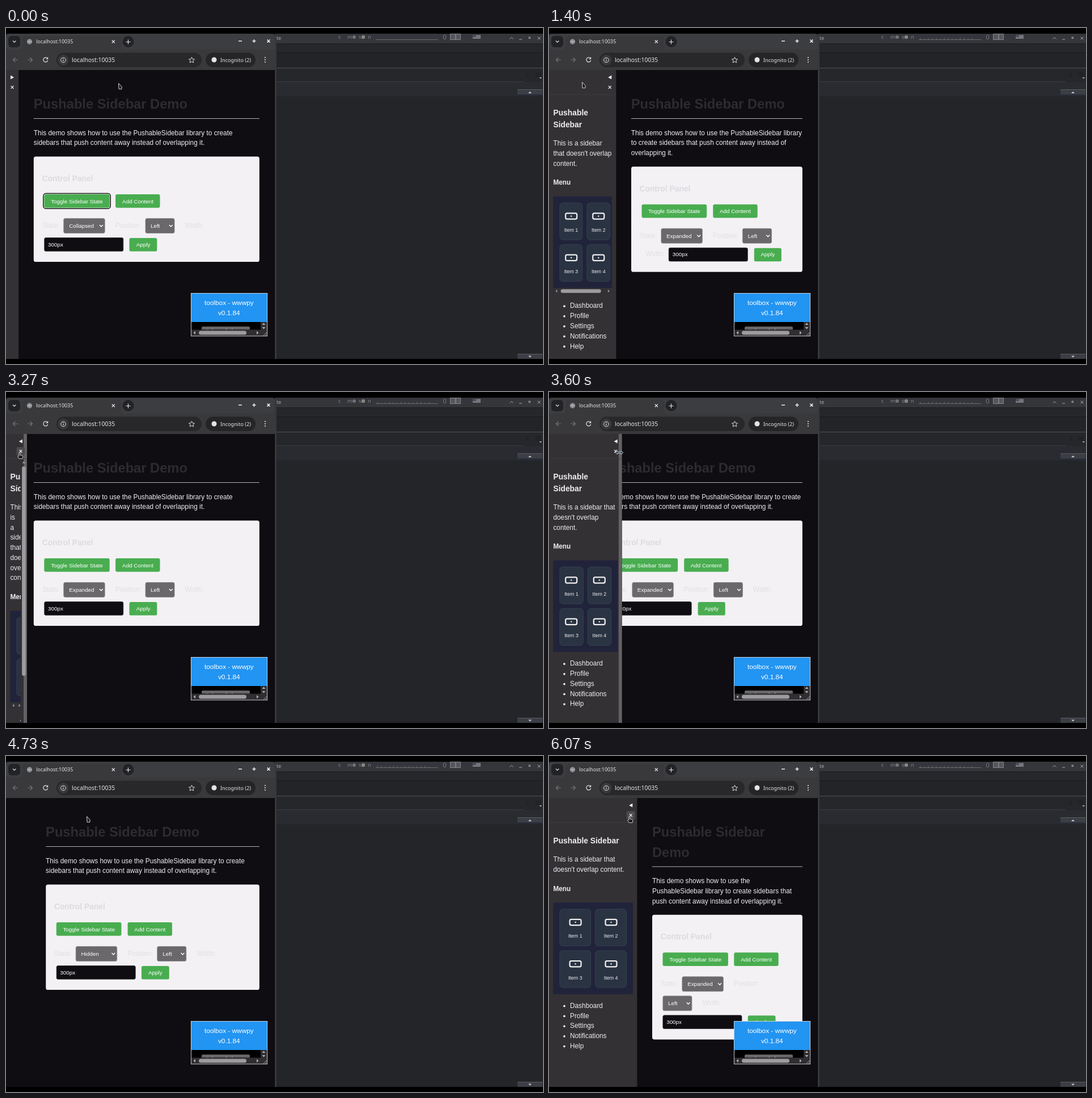
Recreate the animation shown at these times as an HTML page. Size 947x592 px, loop 6.2 s.

```html
<!DOCTYPE html>
<html lang="en">
<head>
<meta charset="utf-8">
<title>Pushable Sidebar Demo</title>
<style>
html, body { margin: 0; width: 100%; height: 100%; overflow: hidden; background: #000; }
#stage { position: absolute; left: 0; top: 0; width: 947px; height: 592px; overflow: hidden; }
#stage > svg { position: absolute; left: 0; top: 0; }
svg text { font-family: "Noto Sans", sans-serif; }
.sans { font-family: "Liberation Sans", Arial, sans-serif; }
/* the page is laid out on a 1280 x 800 screen */
#page {
  position: absolute; left: 0; top: 74px; width: 640px; height: 688px; overflow: hidden;
  transform: scale(.73984); transform-origin: 0 0; background: #0f0d11; color: #eeecef;
  font: 16px/1.5 "Liberation Sans", Arial, sans-serif; pointer-events: none;
}
#main { position: absolute; top: 36px; right: 36px; }
h1 { font-size: 32px; margin: 21.44px 0; padding-bottom: 10px; border-bottom: 1px solid #eeecef; color: #2d2b2f; }
#main p { margin: 0 0 20px; }
#panel { background: #f3f1f4; border-radius: 5px; padding: 20px; color: #e1dfe3; overflow: hidden; }
h3 { font-size: 18.72px; margin: 18.72px 0; }
#panel h3 { color: #dddbdf; }
#panel h3, #side h3 { line-height: 28.08px; }
button, select, input { font: 13.333px "Liberation Sans", Arial, sans-serif; margin: 5px; color: #fff; border-radius: 4px; }
button { padding: 8.5px 16px; border: 0; background: #49ad50; }
button.focus { box-shadow: 0 0 0 1px #fff, 0 0 0 3px #111; }
select { padding: 8.5px 8px; border: 1px solid #858385; background: #6a686a; }
input { padding: 8px; border: 1px solid #29272b; background: #0f0d11; width: 189px; box-sizing: border-box; }
label + select + label { margin-left: 15px; }
#rows { margin-top: 15px; }
#side { position: absolute; left: 0; top: 0; height: 688px; background: #333134; overflow: hidden; }
#head { position: absolute; left: 0; right: 0; top: 0; height: 58px; }
#side.open #head { border-bottom: 1px solid #3f3d40; }
#head svg { position: absolute; right: 0; top: 0; }
#body { position: absolute; left: 0; right: 0; top: 59px; height: 629px; overflow: hidden; display: none; box-sizing: border-box; padding: 0 10px; }
.open #body { display: block; }
#body.scroll { right: 15px; }
#side h3 { margin-top: 28.72px; }
#side p { margin: 0; }
h4 { font-size: 16px; margin: 21.28px 0; }
#grid { position: relative; background: #20233a; padding: 15px; overflow: hidden; display: grid; grid-template-columns: 1fr 1fr; gap: 10px; }
#grid.scroll { padding-bottom: 30px; }
.card { height: 89px; box-sizing: border-box; padding: 15px 10px; border: 1px solid #3c4759; border-radius: 8px; background: #2a3342; text-align: center; font-size: 12px; line-height: 18px; white-space: nowrap; }
.card svg { display: block; margin: 0 auto 8px; }
#hbar { position: absolute; left: 0; bottom: 0; width: 100%; height: 15px; background: #333134; overflow: hidden; }
#hbar i, #vbar i { position: absolute; background: #9d9b9e; border-radius: 5px; }
#hbar i { left: 18px; right: 26px; top: 3px; height: 9px; }
#hbar svg { position: absolute; top: 0; }
ul { margin: 16px 0; padding-left: 40px; }
#vbar { position: absolute; right: 0; top: 59px; width: 15px; height: 629px; }
#vbar i { left: 3px; width: 9px; top: 18px; }
#vbar svg { position: absolute; left: 0; top: 0; }
#grip { position: absolute; right: 0; top: 0; width: 8px; height: 688px; background: #636164; }
</style>
</head>
<body>
<div id="stage">
<svg id="chrome" width="947" height="592"></svg>
<div id="page">
  <div id="main">
    <h1>Pushable Sidebar Demo</h1>
    <p>This demo shows how to use the PushableSidebar library to create sidebars that push content away instead of overlapping it.</p>
    <div id="panel">
      <h3>Control Panel</h3>
      <div><button id="toggle" tabindex="-1">Toggle Sidebar State</button> <button tabindex="-1">Add Content</button></div>
      <div id="rows">
        <label>State:</label>
        <select id="state" tabindex="-1"><option>Expanded</option><option>Collapsed</option><option>Hidden</option></select>
        <label>Position:</label>
        <select tabindex="-1"><option>Left</option><option>Right</option></select>
        <label>Width:</label>
        <input value="300px" tabindex="-1">
        <button tabindex="-1">Apply</button>
      </div>
    </div>
  </div>
  <div id="side">
    <div id="grip"></div>
    <div id="body">
      <h3>Pushable Sidebar</h3>
      <p>This is a sidebar that doesn't overlap content.</p>
      <h4>Menu</h4>
      <div id="grid"></div>
      <ul><li>Dashboard</li><li>Profile</li><li>Settings</li><li>Notifications</li><li>Help</li></ul>
    </div>
    <div id="vbar"><svg width="15" height="15"><path d="M3.5 10.500L7.500 6L11.500 10.500Z" fill="#9d9b9e"/></svg><i id="vthumb"></i></div>
    <div id="head"><svg width="30" height="58">
      <rect id="hot" x="5" width="20" height="20" rx="3" fill="#4c4a4d"/>
      <path id="arrow" fill="#fff"/>
      <path d="M11.700 37.700l6.600 6.600m0-6.600l-6.600 6.600" stroke="#fff" stroke-width="1.500"/>
    </svg></div>
  </div>
</div>
<svg id="over" width="947" height="592"></svg>
</div>
<script>
const $ = id => document.getElementById(id);
const rect = (x, y, w, h, fill, rx = 0, more = "") =>
  `<rect x="${x}" y="${y}" width="${w}" height="${h}" rx="${rx}" fill="${fill}" ${more}/>`;
const line = (d, stroke = "#e3e2e4", w = 1.2) =>
  `<path d="${d}" fill="none" stroke="${stroke}" stroke-width="${w}"/>`;
const shape = (d, fill) => `<path d="${d}" fill="${fill}"/>`;
const disc = (x, y, r, fill, more = "") => `<circle cx="${x}" cy="${y}" r="${r}" fill="${fill}" ${more}/>`;
const text = (x, y, size, fill, s, more = "") =>
  `<text x="${x}" y="${y}" font-size="${size}" fill="${fill}" ${more}>${s}</text>`;

function browser() {
  return rect(0, 10, 474, 30, "#3c3d40", 4) + rect(0, 38, 474, 36, "#39393b")
    + shape("M24 38Q29 38 29 33V19Q29 14 34 14H198Q203 14 203 19V33Q203 38 208 38Z", "#39393b")
    + rect(4, 14, 21, 20, "#222326", 6) + line("M12 22.500l2.700 2.700l2.700-2.700")
    + disc(41.500, 24, 4.800, "#77777a") + line("M37 24H46M41.500 19.500V28.500M38.500 21Q41.500 24 38.500 27M44.500 21Q41.500 24 44.500 27", "#c9c8ca", .8)
    + text(53, 27.200, 8.880, "#e6e5e7", "localhost:10035")
    + line("M186.800 21.500l5 5m0-5l-5 5")
    + disc(215.500, 24, 10, "#222326") + line("M211.500 24.500h8m-4-4v8")
    + line("M410 23h6M434.500 23h6m-3-3v6M460.500 20.500l5 5m0-5l-5 5", "#eeeeef", 1.6)
    + line("M21 56H12.500m4-4l-4 4l4 4M38 56h8.500m-4-4l4 4l-4 4", "#77767a", 1.1)
    + line("M73 53.500A4 4 0 1 0 73.700 57M73.600 51.500V54.500H70.600", "#e3e2e4", 1.2)
    + rect(89, 43.500, 256, 25.500, "#28282b", 12.7) + disc(101, 56.500, 9.500, "#39393b")
    + disc(101, 56.500, 4.300, "none", 'stroke="#e3e2e4"') + line("M101 56v2.800M101 53.800v1.100")
    + text(116, 59.800, 10.360, "#e6e5e7", "localhost:10035")
    + line("M327.500 51.500l1.500 3.200l3.500 .4l-2.600 2.400l.8 3.500l-3.200-1.800l-3.200 1.800l.8-3.500l-2.600-2.400l3.500-.4Z", "#e3e2e4", 1)
    + rect(352, 43.500, 88, 25.500, "#252528", 12.7) + disc(367, 56, 4.500, "#e3e2e4")
    + text(378, 59.500, 9.100, "#e6e5e7", "Incognito (2)")
    + [52, 56, 60].map(y => disc(457, y, 1.1, "#e3e2e4")).join("");
}

function editor() {
  const h = (y, c) => rect(477, y, 470, 1, c);
  return rect(474, 10, 3, 573, "#37383b") + rect(477, 10, 470, 573, "#232529")
    + rect(477, 10, 470, 17, "#34363a") + rect(477, 27, 470, 16, "#25272b")
    + rect(477, 44, 470, 26, "#222428") + rect(477, 71, 470, 23, "#25272b") + rect(477, 95, 470, 25, "#292b30")
    + h(27, "#1c1d20") + h(43, "#191a1d") + h(70, "#505258") + rect(477, 94, 435, 1, "#3a3c41") + h(120, "#25272b")
    + text(477, 21, 9, "#a9aaae", "te")
    + rect(583, 10, 257, 14.500, "#34363b", 3)
    + text(586, 19, 9, "#85868a", "c") + text(602, 19, 9, "#85868a", "m")
    + disc(614, 16, 3, "#707276") + text(622, 19, 9, "#85868a", "s") + disc(630, 16, 3.200, "#84877f")
    + text(638, 19, 9, "#85868a", "n")
    + rect(771.500, 12.500, 4, 7, "none", 1, 'stroke="#77787c"')
    + rect(783.500, 10.500, 18, 10, "#55575d", 0, 'stroke="#85868b"') + line("M793 11V20", "#a0a1a5", 1)
    + rect(823, 12, 14, 7, "#6b6770") + line("M823 14.500h14M823 17.500h14", "#98949a", .8) + rect(823, 12, 6, 4, "#4b4e5e")
    + line("M888.500 19.500l3-3l3 3M905 20h5M922 16h2.500v2.500H922ZM937.500 15.500l5 5m0-5l-5 5", "#a5a6aa", 1)
    + rect(918, 79, 4, 7, "#202226") + rect(934, 78, 9, 8, "#202226")
    + shape("M940.500 87h4.500l-2.250 2.500Z", "#b5b6ba")
    + rect(902, 108, 44, 10, "#3c3e45") + rect(902, 108, 44, 1, "#595b62") + rect(902, 117, 44, 3, "#282c39")
    + shape("M921 115h6l-3-3Z", "#c8c9cd")
    + rect(902, 574, 44, 9, "#3c3e45") + rect(902, 574, 44, 1, "#595b62") + shape("M921 577.500h6l-3 3Z", "#c8c9cd");
}

function toolbox() {
  return rect(326, 467, 135, 76, "#000") + rect(326, 467, 135, 51, "#2294f2")
    + text(393.300, 488, 11.840, "#fff", "toolbox - wwwpy", 'class="sans" text-anchor="middle"')
    + text(393.300, 506, 11.840, "#fff", "v0.1.84", 'class="sans" text-anchor="middle"')
    + `<svg x="327" y="518" width="122" height="13.500">` + rect(18, 8, 85, 20, "#68666a", 2)
    + text(24, 18.500, 9.900, "#fff", "Selected element", 'class="sans"') + `</svg>`
    + rect(449, 518, 11.500, 14, "#302e31") + rect(327, 531.500, 133, 11, "#302e31")
    + rect(340, 533.500, 84, 7, "#9d9b9e", 3.5)
    + shape("M451.500 523h6l-3-3.500ZM451.500 527h6l-3 3.500ZM334 534v6l-3.500-3ZM442 534v6l3.500-3Z", "#b0aeb1")
    + line("M454 542l6-6M457.500 542l2.500-2.500", "#b0aeb1", .9)
    + rect(326.400, 467.400, 134.300, 75.400, "none", 0, 'stroke="#d9dde2" stroke-width=".9"');
}

$("chrome").innerHTML = browser() + editor() + `<path id="graph" fill="none" stroke="#686a6e" stroke-width="1.200"/>`;
$("over").innerHTML = toolbox() + `<g id="cursor">
  <path id="point" d="M.5 .5L1 10.500L5.600 10.800L6.300 6.600Z" fill="#1b1a1c" stroke="#d8d7d9" stroke-width="1"/>
  <path id="hand" d="M-1 .5Q0-.8 1 .5V5L5 6Q6 6.500 5.800 8L5 11.500H-1L-3.500 7.500Q-3.200 6-1 7Z" fill="#1b1a1c" stroke="#d8d7d9" stroke-width=".9"/>
  <path id="resize" d="M-7 0l4-3v2h6v-2l4 3l-4 3v-2h-6v2Z" fill="#2a2b30" stroke="#c4d3e2" stroke-width=".9"/></g>`;
$("grid").innerHTML = [1, 2, 3, 4].map(n => `<div class="card"><svg width="32" height="32">
  <rect x="2.500" y="9" width="27" height="14" rx="3.500" fill="none" stroke="#f0eff0" stroke-width="3"/>
  <circle cx="16" cy="16" r="1.600" fill="#f0eff0"/></svg>Item ${n}</div>`).join("")
  + `<div id="hbar"><svg width="15" height="15"><path d="M9.500 4v7L5.500 7.500Z" fill="#9d9b9e"/></svg><i></i>
  <svg width="15" height="15" style="right:0"><path d="M5.500 4v7l4-3.500Z" fill="#9d9b9e"/></svg></div>`;

const LOOP = 6200, STEP = 200 / 3, SCALE = .73984;
const SLIM = 30, WIDE = 300, LEAST = 50, DRAGGED = 210;
const OPEN = 1315, CLOSE = 1897, DRAG = 3240, DROP = 4060, HIDE = 4605, SHOW = 5240;

// time, x, y of the pointer tip
const PATH = [
  [0, 198, 97], [400, 198, 97], [700, 105, 112], [1000, 18, 94], [1130, 11, 87], [1315, 11, 87],
  [1400, 58, 95], [1600, 165, 92], [1760, 211, 86], [1897, 211, 86], [2067, 108, 87],
  [2330, 45, 98], [2670, 18, 105], [3200, 18, 106], [3267, 24, 106], [3660, 142, 107],
  [3933, 151, 107], [4060, 151, 107], [4260, 142, 106], [LOOP, 142, 106]
];

function pointer(t) {
  let i = 1;
  while (i < PATH.length - 1 && t > PATH[i][0]) i++;
  const [a, ax, ay] = PATH[i - 1], [b, bx, by] = PATH[i];
  const k = Math.min(1, (t - a) / (b - a));
  return [ax + (bx - ax) * k, ay + (by - ay) * k];
}

// CSS "ease" over 300 ms
function ease(ms) {
  const x = Math.max(0, Math.min(1, ms / 300));
  let lo = 0, hi = 1;
  for (let i = 0; i < 24; i++) {
    const s = (lo + hi) / 2, r = 1 - s;
    if (.75 * r * r * s + .75 * r * s * s + s ** 3 < x) lo = s; else hi = s;
  }
  const r = 1 - lo;
  return .3 * r * r * lo + 3 * r * lo * lo + lo ** 3;
}

function sideWidth(t) {
  if (t < CLOSE) return SLIM + (WIDE - SLIM) * ease(t - OPEN);
  if (t < DRAG) return WIDE + (SLIM - WIDE) * ease(t - CLOSE);
  if (t < DROP) return Math.max(LEAST, Math.min(DRAGGED, (pointer(t)[0] + 4.400) / SCALE));
  return DRAGGED;
}

// while dragging, the content trails behind the sidebar
function push(t) {
  if (t < DRAG) return sideWidth(t);
  if (t < HIDE) return [140, 205, 270].reduce((sum, lag) => sum + sideWidth(t - lag), 0) / 3;
  if (t < SHOW) return DRAGGED * (1 - ease(t - HIDE));
  return DRAGGED * ease(t - SHOW);
}

const show = (id, on) => { $(id).style.display = on ? "" : "none"; };

function draw(time) {
  const t = Math.floor((time + 5) / STEP) * STEP;
  const hidden = t >= HIDE && t < SHOW;
  const slim = t < OPEN || (t >= CLOSE && t < DRAG);
  const width = sideWidth(t), [x, y] = pointer(t);

  $("state").value = hidden ? "Hidden" : slim ? "Collapsed" : "Expanded";
  $("toggle").className = t < 1270 ? "focus" : "";
  $("main").style.left = push(t) + 36 + "px";
  $("side").style.width = width + "px";
  $("side").className = slim ? "" : "open";
  show("side", !hidden);
  $("arrow").setAttribute("d", slim ? "M11 13v9l8-4.500Z" : "M19 13v9l-8-4.500Z");

  const body = $("body"), grid = $("grid");
  body.className = grid.className = "";
  const wide = !slim && width - 20 < 148;
  show("hbar", wide);
  if (wide) grid.className = "scroll";
  const over = !slim && body.scrollHeight > 630;
  if (over) body.className = "scroll";
  show("vbar", over);
  if (over) $("vthumb").style.height = 593 * 629 / body.scrollHeight + "px";

  const px = x / SCALE, py = (y - 74) / SCALE;
  const dx = px - width + 15, dragging = t >= DRAG && t < DROP;
  const near = cy => Math.abs(dx) < 11 && Math.abs(py - cy) < 11;
  const back = !hidden && near(17.500), cross = !hidden && near(41);
  const edge = !hidden && (dragging || (px <= width && px > width - 8));
  const hand = (back || cross) && !(edge && t > 3300);
  const resize = edge && !hand;
  show("hot", hand);
  $("hot").setAttribute("y", back ? 7.500 : 31);
  show("grip", edge);
  show("hand", hand);
  show("resize", resize);
  show("point", !hand && !resize);
  $("cursor").setAttribute("transform", `translate(${x} ${y})`);

  let d = "M652 20.500H762";
  if (t > 60) for (let i = 0; i < 14; i++) {
    const gx = 655 + i * 7;
    d += `M${gx} 20v${-(1 + 1.5 * Math.abs(Math.sin(i * 2.3 + Math.floor(t / 800)))).toFixed(1)}`;
  }
  $("graph").setAttribute("d", d);
}

const start = performance.now();
function frame() {
  draw((performance.now() - start) % LOOP);
  requestAnimationFrame(frame);
}
frame();
</script>
</body>
</html>
```
